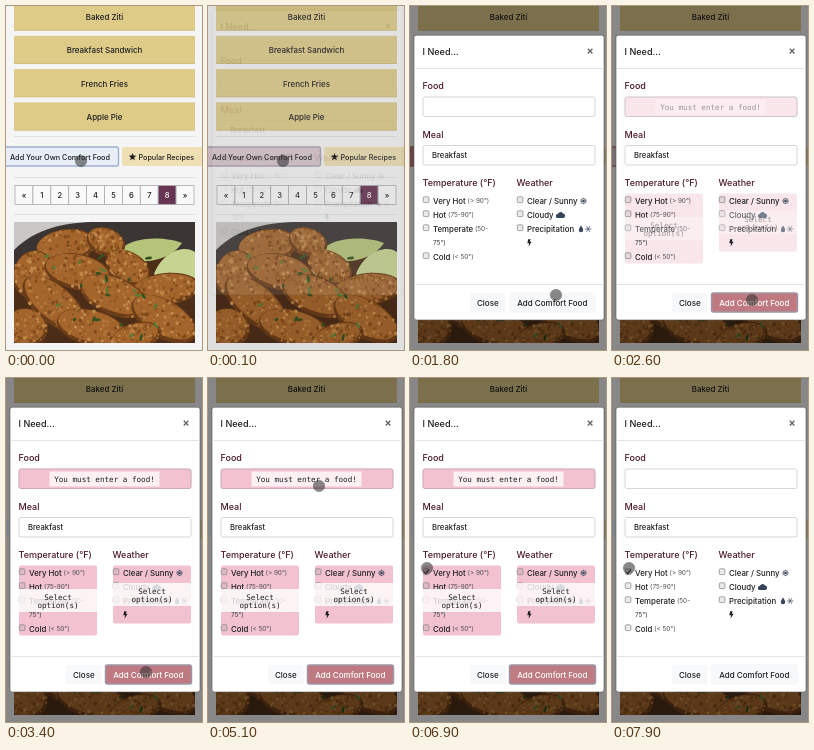
These frames come from a looping animation (196 by 344 pixels, 8000 ms). An HTML page:

```html
<!DOCTYPE html>
<html lang="en">
<head>
<meta charset="utf-8">
<title>Comfort food form</title>
<style>
  html, body { margin: 0; width: 100%; height: 100%; overflow: hidden; background: #f5f5f6; }
  svg { display: block; width: 100%; height: 100%; }
  text { font-family: Inter, Roboto, sans-serif; font-weight: 500; dominant-baseline: central; white-space: pre; }
  .mono { font-family: "DejaVu Sans Mono", monospace; font-weight: 400; }
</style>
</head>
<body>
<svg id="stage" viewBox="0 0 196 344">
  <defs><clipPath id="photoClip"><rect x="8" y="216" width="181" height="121"/></clipPath></defs>
  <g id="page"></g>
  <rect id="backdrop" width="196" height="344"/>
  <g id="modal"></g>
  <circle id="cursor" r="5.8" fill="#333" fill-opacity=".58" stroke="#333" stroke-opacity=".3" stroke-width=".8"/>
</svg>
<script>
const LOOP = 8000;
const INK = '#1c1e21', MAROON = '#4c1a2e';
const ROSE = [190, 122, 128], LIGHT = [247, 248, 249];
const $ = id => document.getElementById(id);

function add(parent, tag, attrs, content) {
  const el = document.createElementNS('http://www.w3.org/2000/svg', tag);
  for (const key in attrs) el.setAttribute(key, attrs[key]);
  if (content) el.textContent = content;
  return parent.appendChild(el);
}
const box = (parent, x, y, width, height, fill, more) =>
  add(parent, 'rect', { x, y, width, height, fill, ...more });
const label = (parent, x, y, text, size = 7.8, more) =>
  add(parent, 'text', { x, y, 'font-size': size, fill: INK, ...more }, text);
const path = (parent, d, fill, more) => add(parent, 'path', { d, fill, ...more });
const rule = (parent, x, y, width, fill = '#dcdddf') => box(parent, x, y, width, .8, fill);
const centered = { 'text-anchor': 'middle' };

function seeded(seed) {
  return () => (seed = (seed * 16807) % 2147483647) / 2147483647;
}

// Page behind the dialog
const page = $('page');
box(page, 0, 0, 196, 344, '#f5f5f6');
['Baked Ziti', 'Breakfast Sandwich', 'French Fries', 'Apple Pie'].forEach((name, i) => {
  const y = -3.5 + i * 33.3;
  box(page, 8, y, 181, 28, '#dfcb88');
  box(page, 8, y + 27.3, 181, .9, '#cfbd80');
  label(page, 98.5, y + 14.5, name, 7.95, centered);
});
rule(page, 8, 130, 181);
rule(page, 8, 171, 181);
rule(page, 8, 208, 181);
const openButton = box(page, -8, 141, 120.5, 19, '', { rx: 2, 'stroke-width': 1.4 });
label(page, 4, 151, 'Add Your Own Comfort Food', 7.3);
box(page, 116, 141, 84, 19, '#eee0b2', { rx: 2 });
const starPoints = Array.from({ length: 10 }, (_, i) => {
  const r = i % 2 ? 1.7 : 4, a = i * Math.PI / 5;
  return [126.5 + r * Math.sin(a), 151 - r * Math.cos(a)];
});
add(page, 'polygon', { points: starPoints.join(' '), fill: INK });
label(page, 132.5, 151, 'Popular Recipes', 7.2);
[...'«12345678»'].forEach((mark, i) => {
  const active = mark === '8', x = 9 + i * 17.9;
  box(page, x, 179.5, 17.9, 19, active ? '#673451' : '#f9f9f9', { stroke: '#a9acb0', 'stroke-width': .8 });
  label(page, x + 9, 189, mark, 7.6, { ...centered, fill: active ? '#fff' : INK });
});

// Photo, simplified to flat shapes
const photo = add(page, 'g', { 'clip-path': 'url(#photoClip)' });
box(photo, 8, 216, 181, 121, '#c9c8c4');
path(photo, 'M8 244C30 222 60 216 92 216H189V337H8Z', '#3a3432');
path(photo, 'M8 272C40 236 150 232 189 268V337H8Z', '#4c2d18');
path(photo, 'M112 246C124 230 158 230 176 237C164 256 128 262 112 246Z', '#b4c479');
path(photo, 'M148 268C156 246 178 238 189 246V272C176 282 158 280 148 268Z', '#c6d391');
const pieces = [
  [60, 240, 30, 17, -8], [100, 236, 20, 14, 20], [27, 268, 20, 24, 20], [72, 266, 34, 18, 12],
  [122, 262, 24, 16, 30], [160, 283, 34, 16, -6], [108, 290, 36, 19, 22], [48, 298, 38, 19, 40],
  [158, 313, 36, 19, 30], [20, 322, 22, 20, 0], [86, 322, 36, 18, 14], [130, 331, 26, 14, -16]
];
const random = seeded(41);
pieces.forEach(([x, y, rx, ry, turn]) => {
  const g = add(photo, 'g', { transform: `translate(${x} ${y}) rotate(${turn})` });
  add(g, 'ellipse', { rx, ry, fill: '#6a3c18' });
  add(g, 'ellipse', { cx: -1, cy: -1.5, rx: rx - 2, ry: ry - 2.5, fill: '#a3652c' });
  for (let n = 0; n < 90; n++) {
    const a = random() * 6.28, r = Math.sqrt(random()) * .95;
    add(g, 'circle', {
      cx: rx * r * Math.cos(a), cy: ry * r * Math.sin(a), r: .6 + random() * 1.3,
      fill: ['#c08a4a', '#7f4a1c', '#b3773a', '#8e5722'][n % 4]
    });
  }
});
for (let n = 0; n < 26; n++) {
  const x = 35 + random() * 120, y = 245 + random() * 88;
  add(photo, 'ellipse', {
    cx: x, cy: y, rx: 1.5 + random() * 3, ry: 1.4, fill: n % 2 ? '#35501f' : '#5f7a34',
    transform: `rotate(${random() * 180} ${x} ${y})`
  });
}

// Dialog
const modal = $('modal');
box(modal, 4, 29.2, 190, 284.8, '#fff', { rx: 2.5, stroke: '#555', 'stroke-width': .6 });
label(modal, 12.5, 45.7, 'I Need...', 9.1);
path(modal, 'M177.8 42.8L182.4 47.4M182.4 42.8L177.8 47.4', 'none', { stroke: '#666', 'stroke-width': 1.4 });
rule(modal, 4, 62, 190);
rule(modal, 4, 278, 190);

const fieldStyle = { rx: 2, stroke: '#c8ccd1', 'stroke-width': .8 };
const heading = (x, y, text) => label(modal, x, y, text, 9, { fill: MAROON });
heading(12.5, 79, 'Food');
heading(12.5, 128, 'Meal');
heading(12.5, 176, 'Temperature (°F)');
heading(106.5, 176, 'Weather');
box(modal, 13, 91, 172, 19.5, '#fff', fieldStyle);
box(modal, 13, 139.5, 172, 19.5, '#fff', fieldStyle);
label(modal, 22, 149.5, 'Breakfast', 7.7);

// Each option column: left edge and height of its error panel
const columns = [[13, 70], [107, 58]], columnTop = 187.5, columnWidth = 78;
const errorBacks = add(modal, 'g', {});
const pink = '#f2c2d0';
box(errorBacks, 13, 91, 172, 19.5, pink, { rx: 2, stroke: '#c9a3af', 'stroke-width': .8 });
columns.forEach(([x, height]) => box(errorBacks, x, columnTop, columnWidth, height, pink, { rx: 2 }));

const noteStyle = { 'font-size': 6.4, fill: '#4c4f53', 'font-weight': 400 };
function option(x, y, text, note) {
  box(modal, x + .8, y - 4.2, 5.6, 5.8, '#888', { rx: 1, 'fill-opacity': .18, stroke: '#8d8d8d', 'stroke-width': .8 });
  const el = label(modal, x + 10.5, y, text, 7.85);
  if (note) add(el, 'tspan', noteStyle, ' ' + note);
}
option(12.5, 195, 'Very Hot', '(> 90°)');
option(12.5, 209, 'Hot', '(75-90°)');
option(12.5, 223, 'Temperate', '(50-');
label(modal, 23, 237, '75°)', 6.4, noteStyle);
option(12.5, 251, 'Cold', '(< 50°)');
option(106.5, 195, 'Clear / Sunny');
option(106.5, 209, 'Cloudy');
option(106.5, 223, 'Precipitation');
const tick = path(modal, 'M14.2 194L15.8 195.8L18.6 191.5', 'none', { stroke: '#222', 'stroke-width': 1.3 });

// Weather icons
const iconInk = '#36455a';
function spokes(x, y, count, inner, outer) {
  for (let i = 0; i < count; i++) {
    const a = i * 2 * Math.PI / count, c = Math.cos(a), s = Math.sin(a);
    path(modal, `M${x + inner * c} ${y + inner * s}L${x + outer * c} ${y + outer * s}`, 'none',
      { stroke: iconInk, 'stroke-width': .7 });
  }
}
add(modal, 'circle', { cx: 173.5, cy: 195, r: 1.3, fill: iconInk });
add(modal, 'circle', { cx: 173.5, cy: 195, r: 2.4, fill: 'none', stroke: iconInk, 'stroke-width': .7 });
spokes(173.5, 195, 8, 2.2, 3.2);
path(modal, 'M148 212A2 2 0 0 1 147.7 208A3 3 0 0 1 153 207.5A2.3 2.3 0 0 1 153.5 212Z', iconInk);
path(modal, 'M171 219.5C174.1 223.5 173.5 226.2 171 226.2S167.9 223.5 171 219.5Z', iconInk);
spokes(178.2, 223, 6, 0, 3.3);
path(modal, 'M118.2 233.2H120.6L119.8 235.7H121.6L118.5 240.8L119.1 237.2H117.3Z', INK);

const errorNotes = add(modal, 'g', {});
const mono = { ...centered, class: 'mono' };
box(errorNotes, 43.5, 93.5, 110, 15, '#fff', { opacity: .75 });
label(errorNotes, 98.5, 101, 'You must enter a food!', 7.6, mono);
columns.forEach(([x, height]) => {
  const center = columnTop + height / 2, middle = x + columnWidth / 2;
  box(errorNotes, x, center - 11.5, columnWidth, 23, '#fff', { opacity: .8 });
  label(errorNotes, middle, center - 3.5, 'Select', 7.6, mono);
  label(errorNotes, middle, center + 4.5, 'option(s)', 7.6, mono);
});

box(modal, 60, 287, 35.5, 19, '#f7f8f9', { rx: 2 });
label(modal, 77.8, 296.5, 'Close', 8, centered);
const submit = box(modal, 99.5, 287, 86, 19, '', { rx: 2, 'stroke-width': 1.5 });
const submitText = label(modal, 142.3, 296.5, 'Add Comfort Food', 8, centered);

// Motion
const clamp = v => Math.min(1, Math.max(0, v));
const ramp = (t, from, to) => clamp((t - from) / (to - from));
const mix = (a, b, k) => `rgb(${a.map((v, i) => Math.round(v + (b[i] - v) * k))})`;
const smooth = k => k * k * (3 - 2 * k);
const cursorPath = [
  [0, 75, 155], [1000, 75, 155], [1200, 92, 186], [1400, 92, 186], [1800, 146, 289],
  [2000, 140, 294], [4200, 140, 294], [5100, 111, 108], [5400, 111, 108],
  [6200, 27, 203], [6800, 17, 190], [LOOP, 17, 190]
];
function cursorAt(t) {
  const i = cursorPath.findIndex(p => p[0] > t);
  const [t0, x0, y0] = cursorPath[i - 1], [t1, x1, y1] = cursorPath[i];
  const k = smooth(ramp(t, t0, t1));
  return [x0 + (x1 - x0) * k, y0 + (y1 - y0) * k];
}

function draw(t) {
  const slide = 1 - (1 - ramp(t, 260, 700)) ** 2;
  modal.setAttribute('transform', `translate(0 ${-25 * (1 - slide)})`);
  modal.setAttribute('opacity', ramp(t, 80, 300));
  $('backdrop').setAttribute('opacity', .45 * ramp(t, 50, 300));

  const pressed = ramp(t, 50, 200) - ramp(t, 2400, 2700);
  const opened = ramp(t, 50, 200);
  openButton.setAttribute('fill', mix([232, 238, 247], ROSE, pressed));
  openButton.setAttribute('stroke', mix([159, 179, 207], pressed ? ROSE : LIGHT, opened));

  const error = ramp(t, 2400, 2900) - ramp(t, 6900, 7400);
  errorBacks.setAttribute('opacity', error);
  errorNotes.setAttribute('opacity', error);

  const focus = ramp(t, 2350, 2550) - ramp(t, 6900, 7100);
  submit.setAttribute('fill', mix(LIGHT, ROSE, focus));
  submit.setAttribute('stroke', mix(LIGHT, [158, 150, 168], focus));
  submitText.setAttribute('fill', mix([28, 30, 33], [255, 255, 255], focus));
  tick.setAttribute('visibility', t >= 6900 ? 'visible' : 'hidden');

  const [x, y] = cursorAt(t);
  $('cursor').setAttribute('cx', x);
  $('cursor').setAttribute('cy', y);
}

const start = performance.now();
function frame() {
  draw((performance.now() - start) % LOOP);
  requestAnimationFrame(frame);
}
draw(0);
requestAnimationFrame(frame);
</script>
</body>
</html>
```
